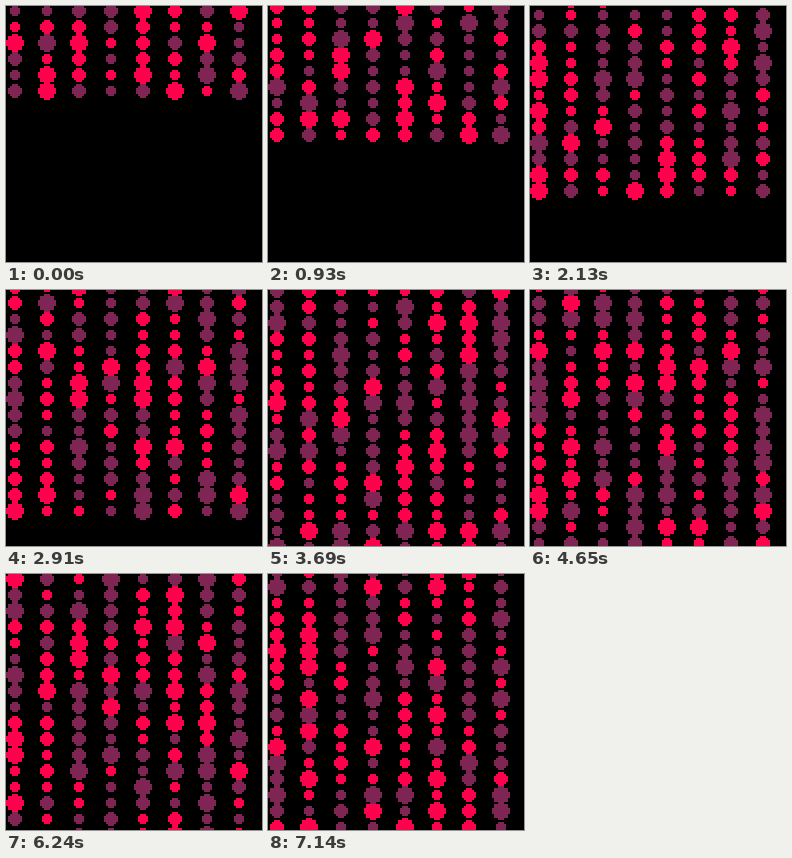
These frames come from a looping animation (256x256 px, 7170 ms). An HTML page with a canvas:

```html
<!DOCTYPE html>
<html lang="en">
<head>
<meta charset="utf-8">
<title>Falling dots</title>
<style>
html, body { margin: 0; height: 100%; overflow: hidden; background: #000; }
canvas { display: block; width: 100vw; height: 100vh; image-rendering: pixelated; }
</style>
</head>
<body>
<canvas id="stage" width="128" height="128"></canvas>
<script>
const ctx = document.getElementById('stage').getContext('2d');
const LOOP = 7170;
const RED = '#ff004d', PURPLE = '#7e2553';

// Colour cycle of each column: r = red, p = purple
const CYCLES = [
  'pprrrrrrpprrpp',
  'rprrrrrprprprr'.replace(/prr$/, 'rrr'),
  'pppppprrpprrrr',
  'prppprppppprpr',
  'pprrpppprrrrrr',
  'rrrprprprrrprr',
  'rrrrpppppprrpp',
  'ppppprprprpppr'
].map(cycle => [...cycle].map(c => c === 'r' ? RED : PURPLE));
CYCLES[1] = [...'rprrrrrprprprr'].map(c => c === 'r' ? RED : PURPLE);

// Half widths of a pixel disc, from its middle row outwards
const DISCS = [[2, 2, 1], [3, 3, 2, 1], [4, 4, 3, 3, 1]];

// Steps last 90 ms, except a few that come 30 ms early
const EARLY = [4, 11, 17, 24, 33, 42, 50, 67];
const stepTime = n => 90 * n - 30 * EARLY.filter(e => e <= n).length;

function stepAt(t) {
  let n = 0;
  while (stepTime(n + 1) <= t) n++;
  return n;
}

function random(col, row, step) {
  let h = Math.imul(col + 1, 374761393) ^ Math.imul(row + 1, 668265263) ^ Math.imul(step + 1, 1274126177);
  h = Math.imul(h ^ h >>> 15, 2246822519);
  h = Math.imul(h ^ h >>> 13, 3266489917);
  return ((h ^ h >>> 16) >>> 0) / 2 ** 32;
}

function disc(x, y, halves) {
  halves.forEach((w, d) => {
    ctx.fillRect(x - w, y - d, 2 * w + 1, 1);
    ctx.fillRect(x - w, y + d, 2 * w + 1, 1);
  });
}

function draw(n) {
  ctx.fillStyle = '#000';
  ctx.fillRect(0, 0, 128, 128);
  for (let row = 0, y = 42 + 2 * n; y >= -4; row++, y -= 8) {
    if (y > 132) continue;
    const phase = (n - row + 140) % 14;
    CYCLES.forEach((cycle, col) => {
      const r = random(col, row, n);
      ctx.fillStyle = cycle[phase];
      disc(4 + 16 * col, y, DISCS[r < 0.34 ? 0 : r < 0.75 ? 1 : 2]);
    });
  }
}

const start = performance.now();
function tick() {
  draw(stepAt((performance.now() - start) % LOOP));
  requestAnimationFrame(tick);
}
tick();
</script>
</body>
</html>
```
